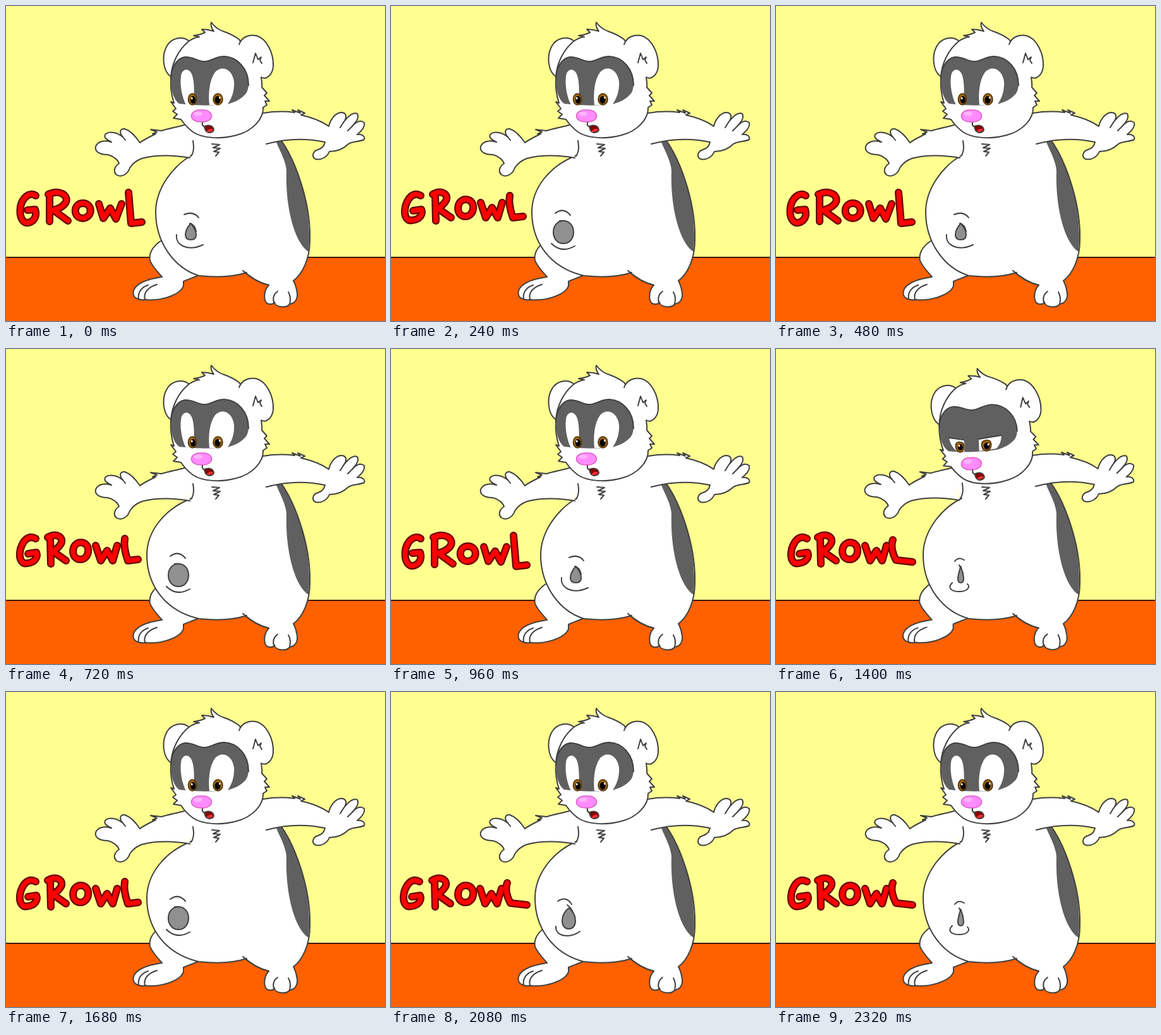
These frames come from a looping animation (600 px wide and 500 px high, 2.4 s). An HTML page:

```html
<!DOCTYPE html>
<html lang="en">
<head>
<meta charset="utf-8">
<title>Growl</title>
<style>
  html, body { margin: 0; width: 100%; height: 100%; overflow: hidden; background: #ffff90; }
  svg { display: block; width: 600px; height: 500px; }
  .ink { stroke: #404040; stroke-width: 2; stroke-linecap: round; stroke-linejoin: round; }
  .skin { fill: #fff; }
  .line { fill: none; }
  .dark { fill: #606060; stroke: none; }
  .iris { fill: #9a6410; stroke: #4a2c00; stroke-width: 1.5; }
  #word { fill: none; stroke-linecap: round; stroke-linejoin: round; }
</style>
</head>
<body>
<svg viewBox="0 0 600 500">
  <rect width="600" height="500" fill="#ffff90"/>
  <rect y="399" width="600" height="101" fill="#ff6000"/>
  <path d="M0 399H600" stroke="#401a00" stroke-width="2"/>

  <g id="word"></g>

  <g id="legs" class="ink skin">
    <path d="M248 371C232 381 226 393 228 404C232 414 241 423 247 430C227 433 206 439 202 452C199 463 210 468 221 466C248 469 277 457 281 444L281 437C290 433 300 430 308 426L330 390Z"/>
    <path class="line" d="M210 465C208 453 216 446 225 443M220 466C217 454 226 446 239 442"/>
    <path d="M375 420C388 432 403 440 416 443C407 453 407 471 416 473C421 474 424 472 425 470C426 479 446 480 449 473C460 472 463 461 460 451C459 443 456 438 454 434L470 410Z"/>
    <path class="line" d="M424 471C422 463 424 457 430 453M449 473C451 465 450 459 447 454"/>
  </g>

  <path class="skin" d="M278 188L410 172L434 211C456 240 483 310 481 372C481 400 470 425 455 436L416 442L375 420L300 420L292 240Z"/>
  <path class="dark" d="M426 211L434 211C456 240 486 310 479 390C457 376 442 320 444 262C443 244 432 228 426 211Z"/>
  <path class="ink line" d="M434 211C456 240 483 310 481 372C481 400 470 425 455 436"/>
  <path id="belly" class="ink skin"/>
  <path id="folds" class="ink line"/>
  <path id="navel" class="ink" fill="#909090"/>
  <path class="ink line" d="M375 420C388 432 403 440 416 443"/>

  <g id="arms" class="ink skin">
    <path d="M282 189C266 193 256 195 246 198L229 196L239 200L232 203L237 203C227 208 218 212 212 217C206 208 197 198 188 195C180 194 179 202 185 208C177 201 164 198 158 203C153 208 160 213 167 216C156 212 145 215 142 223C140 232 150 236 161 236C170 238 177 244 179 250C172 254 169 263 175 268C184 273 193 266 196 257C201 249 207 245 215 242C238 236 267 237 291 241"/>
    <path class="line" d="M185 208L189 213M296 214C298 225 297 233 293 238"/>
    <path d="M407 170C425 167 442 167 457 169L453 165L466 170L462 165L473 170L467 173C485 177 500 183 511 191C513 181 521 170 530 169C539 169 541 176 534 185C540 177 549 168 556 171C560 178 553 185 548 191C554 184 561 180 567 185C569 192 562 199 556 204C564 203 569 207 567 212C559 216 550 214 542 219C534 227 524 231 512 231C509 239 500 245 490 243C483 239 486 230 494 228C501 226 504 221 505 216C478 210 445 210 412 219"/>
    <path class="line" d="M534 185L529 193M548 191L541 198"/>
  </g>
  <path class="ink line" d="M326 219L338 220L328 225L339 226L329 231L337 232L332 238"/>

  <g id="head">
    <g class="ink skin">
      <path d="M289 55C278 47 262 51 255 63C246 78 248 104 262 113L290 90Z"/>
      <path d="M261 114C262 90 274 69 288 57Q297 50 306 49L297 47Q307 46 315 42L310 37Q320 37 329 40Q323 32 325 26Q333 37 346 41Q358 45 369 53L404 110C404 118 406 123 405 129L413 138L409 142L417 151L410 151L413 157L407 161C408 180 389 199 365 205C340 212 311 210 296 200C288 194 281 186 277 180L265 178L271 172L264 167L269 163L261 152L266 154C262 142 260 128 261 114Z"/>
      <path d="M369 61C373 49 385 45 396 47C412 51 424 74 423 96C422 109 412 118 404 113L360 115Z" stroke="none"/>
      <path class="line" d="M369 61C373 49 385 45 396 47C412 51 424 74 423 96C422 109 412 118 404 113"/>
      <path class="line" d="M391 90L395 75L399 85L404 81L402 86L405 91"/>
    </g>
    <g id="face">
      <path class="dark" d="M261 116C261 99 270 83 283 81C296 80 301 87 313 88C326 88 330 80 346 80C366 81 384 99 384 126C383 134 381 138 379 140C372 148 362 153 350 156Q310 160 274 155C265 148 261 134 261 116Z"/>
      <path class="ink line" d="M261 116C261 99 270 83 283 81C296 80 301 87 313 88C326 88 330 80 346 80C366 81 384 99 384 126"/>
      <g id="wide">
        <path class="skin" d="M277 112C278 101 287 97 293 106C299 117 298 139 297 157L285 157C279 146 275 126 277 112ZM322 157C320 139 322 117 331 105C341 94 358 99 361 120C362 135 357 148 350 157Z"/>
        <ellipse class="iris" cx="295" cy="148" rx="6.5" ry="9"/>
        <ellipse class="iris" cx="335.500" cy="148" rx="7.500" ry="9"/>
        <ellipse cx="296" cy="149" rx="4" ry="6"/>
        <ellipse cx="335" cy="149" rx="4.500" ry="6"/>
        <path d="M293 145h2.500v3h-2.500zM337 144h2.500v3h-2.500z" fill="#fff"/>
      </g>
    </g>
    <g id="snout">
      <rect x="293.500" y="165" width="32" height="19" rx="13" ry="9.500" fill="#ff8cff" stroke="#e060c8" stroke-width="1.6"/>
      <ellipse cx="304" cy="171" rx="7" ry="3.500" fill="#ffb4ff"/>
      <path class="ink line" d="M311 185C310 189 312 191 315 192"/>
      <path d="M314 191Q321 188 326 191Q332 197 326 200Q316 204 314 191Z" fill="#8a0000" class="ink"/>
      <path d="M318 199Q321 193 328 196Q327 200 318 200Z" fill="#ff3030"/>
    </g>
  </g>
  <g id="squint">
    <path class="skin" d="M274 141L297 143C299 150 299 157 298 163L286 162C280 157 276 150 274 141ZM321 143L357 137C357 146 354 153 349 158L322 162Z"/>
    <path class="ink line" d="M274 141L297 144M321 143L357 137"/>
    <path class="iris" d="M286 149C289 147 294 147 297 150C299 157 297 164 292 164C285 163 283 154 286 149ZM327 147C330 144 336 144 339 146C343 152 340 161 334 162C327 162 324 153 327 147Z"/>
    <ellipse cx="292" cy="156" rx="4" ry="5"/>
    <ellipse cx="334" cy="154" rx="4.500" ry="5.500"/>
    <path d="M289 152h2.500v3h-2.500zM335 150h2.500v3h-2.500z" fill="#fff"/>
  </g>
</svg>
<script>
const $ = id => document.getElementById(id);
const set = (id, name, value) => $(id).setAttribute(name, value);

const calm = [
  'M47 301C37 294 26 305 23 318C20 337 28 346 36 344C46 341 49 332 46 323L34 324',
  'M69 301L69 342M67 299C84 291 99 300 95 311C91 319 83 322 75 324L98 341',
  'M121 313C106 314 106 336 121 337C138 336 138 313 121 313Z',
  'M147 314L154 337L165 321L174 338L183 314',
  'M194 296L198 345L215 343'
];
const shaky = [
  'M49 301C37 294 29 305 25 317C21 335 28 342 36 340C48 339 53 330 50 323L37 325',
  'M70 301L71 341M66 299C80 291 92 299 87 309C83 316 78 319 74 321L95 336',
  'M117 307C102 308 101 332 115 334C132 336 135 307 117 307Z',
  'M141 312L149 336L159 320L168 336L175 312',
  'M185 303C181 313 185 326 190 335L216 338'
];

// Each stage of the swelling belly: left edge, navel shape, skin folds, lettering shifts
const stages = [
  { x: 237, navel: [292.5, 8.5, 345, 371, 13], glyphs: calm, shift: [0, 0, 0, 0, 0],
    folds: 'M282 331Q297 325 305 336M291 345Q299 347 301 358M270 363C268 380 288 390 312 379' },
  { x: 233, navel: [292.5, 4.5, 345, 371, 18], glyphs: shaky, shift: [0, 0, 0, 0, 0],
    folds: 'M283 337Q289 329 298 335M290 343Q292 347 296 356M279 371C270 380 279 385 290 385C302 385 309 378 303 373' },
  { x: 228, navel: [281.5, 10.5, 343, 376, 9], glyphs: shaky, shift: [-4, -1, 1, 0, -1],
    folds: 'M264 332Q277 323 286 337M279 338Q286 343 289 352M261 372C260 389 284 391 299 380' },
  { x: 223, navel: [273, 16, 341, 377, 0], glyphs: shaky, shift: [-2, 0, 1, 1, 0],
    folds: 'M260 329Q273 319 284 332M267 341Q278 339 285 348M254 377Q270 393 291 381' }
];
stages[3].glyphs = [...shaky.slice(0, 4), 'M188 301C186 312 189 325 193 336L209 334'];

function teardrop([x, r, top, bottom, taper]) {
  const w = r * 4 / 3;
  return `M${x} ${top}C${x + w} ${top + taper} ${x + w} ${bottom} ${x} ${bottom}` +
    `S${x - w} ${top + taper} ${x} ${top}Z`;
}

function lettering({ glyphs, shift }) {
  const layer = (color, width) => glyphs.map((d, i) =>
    `<path d="${d}" transform="translate(${shift[i]})" stroke="${color}" stroke-width="${width}"/>`).join('');
  return layer('#640000', 12) + layer('#ff0000', 7.5);
}

let shown = -1;
function draw(now) {
  const t = now % 2400;
  const tick = Math.floor(t / 40);
  if (tick !== shown) {
    shown = tick;
    const step = Math.floor(t / 80) % 6;
    const stage = stages[Math.min(step, 6 - step)];
    const x = stage.x;
    $('word').innerHTML = lettering(stage);
    set('belly', 'd', `M294 237C${x + 27} 254 ${x} 290 ${x} 327C${x} 376 ${x + 30} 416 305 428C333 431 360 430 381 423`);
    set('folds', 'd', stage.folds);
    set('navel', 'd', teardrop(stage.navel));

    const nod = t >= 1160 && t < 1680;
    const shake = t >= 1200 && t < 1680;
    const side = tick % 2 ? -1 : 1;
    const dx = shake ? side * 1.2 : 0, dy = shake ? side : 0;
    set('arms', 'transform', `translate(${dx} ${dy})`);
    set('legs', 'transform', `translate(${dx / 3} ${dy / 3})`);
    set('head', 'transform', `translate(${dx} ${dy})` + (nod ? 'translate(1 3) rotate(-2.36 395 175)' : ''));
    set('face', 'transform', nod ? 'translate(0 8) scale(1 .95)' : '');
    set('snout', 'transform', nod ? 'translate(0 2)' : '');
    set('squint', 'transform', `translate(${dx + 1} ${dy + 1})`);
    set('wide', 'display', nod ? 'none' : 'inline');
    set('squint', 'display', nod ? 'inline' : 'none');
  }
  requestAnimationFrame(() => draw(performance.now() - start));
}
const start = performance.now();
draw(0);
</script>
</body>
</html>
```
